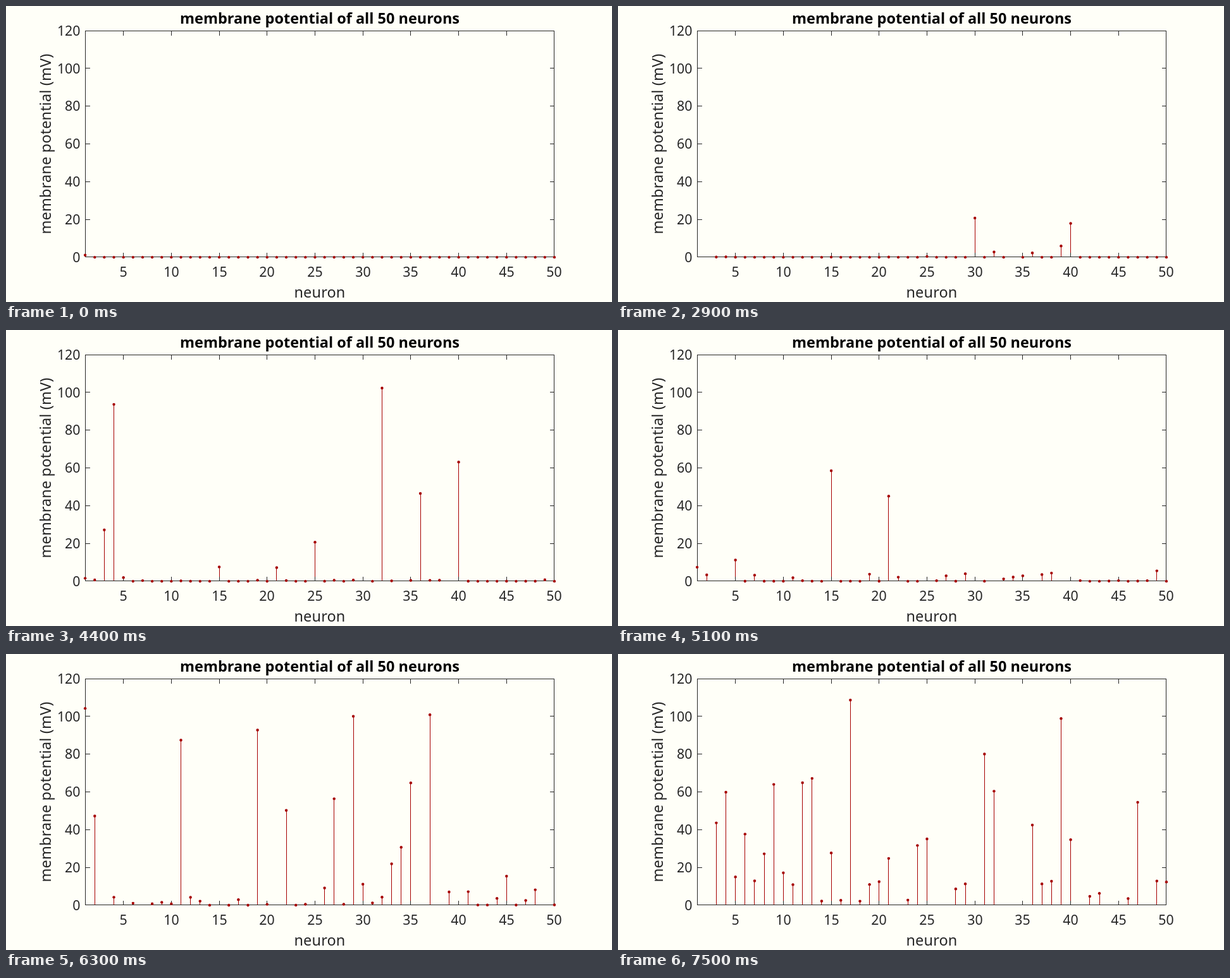
An HTML page for the animation above (7600 ms loop, 958 by 469 pixels).

```html
<!DOCTYPE html>
<html lang="en">
<head>
<meta charset="utf-8">
<title>Membrane potential</title>
<style>
  html, body { margin: 0; width: 100%; height: 100%; overflow: hidden; background: #fffff8; }
  svg { display: block; width: 958px; height: 469px; }
  text { font: 21.33px "Noto Sans", "Open Sans", sans-serif; fill: #262626; text-anchor: middle; }
  .label { font-size: 23.47px; letter-spacing: .15px; }
  .title { font-size: 23.47px; font-weight: bold; fill: #000; }
  .value { text-anchor: end; }
  .axis { fill: none; stroke: #262626; shape-rendering: crispEdges; }
  .stem { fill: #a60000; shape-rendering: crispEdges; }
  .dot { fill: #a60000; }
</style>
</head>
<body>
<svg viewBox="0 0 958 469">
  <g id="frame">
    <text class="title" x="496" y="28">membrane potential of all 50 neurons</text>
    <text class="label" x="496" y="462">neuron</text>
    <text class="label" transform="translate(71 218.5) rotate(-90)">membrane potential (mV)</text>
  </g>
  <g id="stems"></g>
  <g id="dots"></g>
</svg>
<script>
const COUNT = 50, STEP = 100, STEPS = 76;
const LEFT = 125.12, RIGHT = 866.98, TOP = 39.02, BASE = 397.82;
const THRESHOLD = 110;

const $ = id => document.getElementById(id);
const xOf = n => LEFT + (n - 1) * (RIGHT - LEFT) / (COUNT - 1);
const yOf = v => BASE - v * (BASE - TOP) / 120;
const pixel = p => Math.floor(p) + .5;

function add(parent, tag, attrs, text) {
  const el = document.createElementNS('http://www.w3.org/2000/svg', tag);
  for (const k in attrs) el.setAttribute(k, attrs[k]);
  if (text !== undefined) el.textContent = text;
  return parent.appendChild(el);
}

let seed = 7;
function random(min, max) {
  seed = (seed * 16807) % 2147483647;
  return min + (max - min) * seed / 2147483647;
}

// The neurons that start the cascade: step of the first spike and growth rate.
const leaders = {
  1: [8.1, .568], 2: [17.1, .56], 34: [22, .54], 30: [33.5, .37], 39: [38.7, .3],
  32: [44.3, .24], 4: [44.4, .4], 36: [48.3, .2], 40: [50.6, .084]
};

const neurons = Array.from({ length: COUNT }, (_, i) => {
  const [first, rate] = leaders[i + 1] || [random(48, 90), random(.22, .36)];
  const second = Math.max(first + 12, 60 + .4 * first);
  return { first, rate, second, wake: (first + second) / 2, start: i ? leaders[1][0] : 0 };
});

// Exponential rise to a spike, silence below zero, then a slower rise.
function potential(cell, t) {
  const rise = (spike, rate) => THRESHOLD * Math.exp(rate * (t - spike));
  if (t < cell.start) return 0;
  if (t < cell.first) return rise(cell.first, cell.rate);
  if (t < cell.wake || t >= cell.second) return null;
  return rise(cell.second, .22);
}

const frame = $('frame');
const left = pixel(LEFT), right = pixel(RIGHT), top_ = pixel(TOP), base = pixel(BASE);
let axis = `M${left} ${top_}H${right}V${base}H${left}Z`;
for (let n = 5; n <= COUNT; n += 5) {
  const x = pixel(xOf(n));
  axis += `M${x} ${base}v-7M${x} ${top_}v7`;
  add(frame, 'text', { x, y: 429 }, n);
}
for (let v = 0; v <= 120; v += 20) {
  const y = pixel(yOf(v));
  axis += `M${left} ${y}h7M${right} ${y}h-7`;
  add(frame, 'text', { class: 'value', x: 117.5, y: yOf(v) + 7.8 }, v);
}

const stems = neurons.map((_, i) =>
  add($('stems'), 'rect', { class: 'stem', x: Math.floor(xOf(i + 1)), width: 1 }));
add($('stems'), 'path', { class: 'axis', d: axis });
const dots = neurons.map((_, i) =>
  add($('dots'), 'circle', { class: 'dot', cx: xOf(i + 1), r: 2.2 }));

function draw(step) {
  neurons.forEach((cell, i) => {
    const v = potential(cell, step);
    stems[i].style.display = dots[i].style.display = v === null ? 'none' : 'inline';
    if (v === null) return;
    const y = yOf(v);
    stems[i].setAttribute('y', y);
    stems[i].setAttribute('height', BASE - y);
    dots[i].setAttribute('cy', y + .3);
  });
}

const start = performance.now();
let last = -1;
function tick(now) {
  const step = Math.floor(Math.max(0, now - start) / STEP) % STEPS;
  if (step !== last) draw(last = step);
  requestAnimationFrame(tick);
}
tick(start);
</script>
</body>
</html>
```
